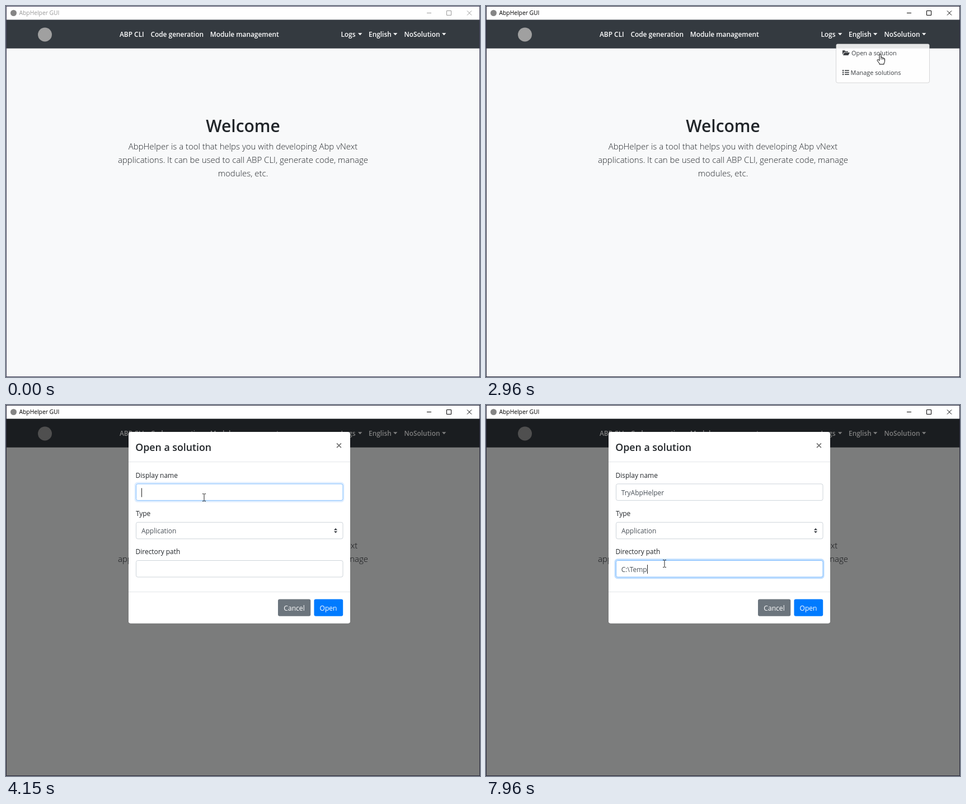
Recreate the animation shown at these times as an HTML page with a canvas. Size 847x662 px, loop 8000 ms.

```html
<!DOCTYPE html>
<html lang="en">
<head>
<meta charset="utf-8">
<title>AbpHelper GUI</title>
<style>
  html, body { margin: 0; width: 847px; height: 662px; overflow: hidden; }
  canvas { display: block; }
</style>
</head>
<body>
<canvas id="stage" width="847" height="662"></canvas>
<script>
const W = 847, H = 662, LOOP = 8000;
const screen2d = document.getElementById('stage').getContext('2d');
const layer = document.createElement('canvas');
layer.width = W;
layer.height = H;
const layer2d = layer.getContext('2d');
let ctx = screen2d;

const INK = '#212529';
const MODAL = [219, 48, 396, 341.5, 4];

// ---------- drawing helpers ----------
function text(str, x, y, size, color = INK, weight = 400, align = 'left') {
  ctx.font = `${weight} ${size}px "Open Sans", "Noto Sans", sans-serif`;
  ctx.textAlign = align;
  ctx.fillStyle = color;
  ctx.fillText(str, x, y);
}

function rect(x, y, w, h, color) {
  ctx.fillStyle = color;
  ctx.fillRect(x, y, w, h);
}

function box(x, y, w, h, r, fill, stroke, width = 1) {
  ctx.beginPath();
  ctx.roundRect(x, y, w, h, r);
  if (fill) { ctx.fillStyle = fill; ctx.fill(); }
  if (stroke) { ctx.strokeStyle = stroke; ctx.lineWidth = width; ctx.stroke(); }
}

function disc(x, y, r, color) {
  ctx.beginPath();
  ctx.arc(x, y, r, 0, Math.PI * 2);
  ctx.fillStyle = color;
  ctx.fill();
}

function shape(points, color) {
  ctx.beginPath();
  points.forEach(([x, y]) => ctx.lineTo(x, y));
  ctx.closePath();
  ctx.fillStyle = color;
  ctx.fill();
}

function cross(x, y, r, color, width) {
  ctx.beginPath();
  ctx.moveTo(x - r, y - r); ctx.lineTo(x + r, y + r);
  ctx.moveTo(x + r, y - r); ctx.lineTo(x - r, y + r);
  ctx.strokeStyle = color;
  ctx.lineWidth = width;
  ctx.stroke();
}

// Paints a group on its own layer, then blends it as a whole.
function fade(alpha, paint) {
  if (alpha <= 0) return;
  layer2d.clearRect(0, 0, W, H);
  ctx = layer2d;
  paint();
  ctx = screen2d;
  ctx.globalAlpha = alpha;
  ctx.drawImage(layer, 0, 0);
  ctx.globalAlpha = 1;
}

// ---------- timing helpers ----------
// Value of the last [time, value] pair that has been reached.
function hold(t, pairs, value) {
  for (const [time, next] of pairs) if (t >= time) value = next;
  return value;
}

// Eased progress in whole steps, so the pointer jumps as in a screen recording.
function stepped(t, start, interval, count, first = 1) {
  const k = Math.floor((t - start) / interval) + first;
  const p = Math.min(1, Math.max(0, k / count));
  return p * p * (3 - 2 * p);
}

// ---------- window ----------
function drawWindow(active) {
  const tone = active ? '#000' : '#999';
  rect(0, 0, W, H, active ? '#2b2a3c' : '#45435c');
  rect(1, 1, W - 2, 24, '#fff');
  disc(13.5, 12.5, 5.5, '#858585');
  text('AbpHelper GUI', 23.5, 16.3, 10.3, tone);
  rect(752, 12, 8, 1, tone);
  box(787.5, 8.5, 8, 8, 0, null, tone);
  cross(828, 12.5, 4, tone, 1);
}

function drawPage() {
  rect(1, 25, W - 2, H - 26, '#f8f9fa');
  rect(1, 24.5, W - 2, 51.2, '#343a40');
  disc(69.5, 51, 12.5, '#a0a0a0');

  const links = [['ABP CLI', 203], ['Code generation', 258.4], ['Module management', 364.7],
    ['Logs', 598.4], ['English', 648], ['NoSolution', 711.4]];
  for (const [label, x] of links) text(label, x, 55, 11.9, '#fff', 600);
  for (const x of [629, 692, 779]) shape([[x, 48.3], [x + 7.4, 48.3], [x + 3.7, 52.2]], '#fff');

  text('Welcome', 423.5, 225, 30, INK, 600, 'center');
  const lead = ['AbpHelper is a tool that helps you with developing Abp vNext',
    'applications. It can be used to call ABP CLI, generate code, manage', 'modules, etc.'];
  lead.forEach((line, i) => text(line, 423.5, 256 + i * 24, 15, INK, 300, 'center'));
}

function drawMenu() {
  box(625.5, 67.5, 167, 69.5, 3, '#fff', 'rgba(0,0,0,.17)');
  shape([[637, 87], [637, 79.3], [641, 79.3], [642.4, 80.8], [647, 80.8], [647, 82.3],
    [639.8, 82.3]], INK);
  shape([[638, 88], [640.3, 83.1], [650, 83.1], [647.4, 88]], INK);
  text('Open a solution', 653, 87.7, 10.9);
  for (const y of [114, 117.5, 121]) {
    rect(637, y, 2.2, 2.2, INK);
    rect(641, y + 0.3, 7.8, 1.6, INK);
  }
  text('Manage solutions', 651.6, 122.7, 10.9);
}

// ---------- dialog ----------
function drawBackdrop(alpha) {
  if (!alpha) return;
  ctx.beginPath();
  ctx.rect(1, 25, W - 2, H - 26);
  ctx.roundRect(...MODAL);
  ctx.fillStyle = `rgba(0,0,0,${alpha / 2})`;
  ctx.fill('evenodd');
}

function drawField(y, focus = 0) {
  if (focus) box(231, y - 1.2, 372, 32.9, 4, null, `rgba(0,123,255,${focus * 0.25})`, 3);
  box(232.5, y + 0.5, 369.5, 29.5, 3, '#fff', focus ? '#80bdff' : '#ced4da');
}

function drawInput(y, value, caret, misspelt) {
  const x = 241.7;
  text(value, x, y + 20.6, 11.95, '#495057');
  const width = ctx.measureText(value).width;
  if (misspelt) {
    ctx.beginPath();
    for (let dx = 0; dx <= width; dx += 2) ctx.lineTo(x + dx, y + (dx % 4 ? 23.6 : 22));
    ctx.strokeStyle = '#e5484d';
    ctx.lineWidth = 1;
    ctx.stroke();
  }
  if (caret) rect(Math.round(x + width), y + 8, 1, 16, '#222');
}

function drawModal(t) {
  const nameFocus = t < 5640 ? hold(t, [[4150, 0.5], [4230, 1]], 0) : 0;
  const pathFocus = hold(t, [[5640, 0.4], [5710, 0.8], [5790, 1]], 0);
  const name = t >= 4870 ? 'TryAbpHelper' : '';
  const typed = hold(t, [[6250, 1], [6780, 2], [6940, 3], [7410, 4], [7660, 5], [7790, 6], [7960, 7]], 0);
  const nameCaret = nameFocus && !(t >= 4620 && t < 4870);
  const pathCaret = pathFocus && !(t >= 6170 && t < 6250);

  box(...MODAL, '#fff');
  text('Open a solution', 231.3, 82, 17.75, INK, 600);
  cross(595, 72.3, 3.9, '#777', 1.8);
  rect(219, 101, 396, 1, '#e3e6e9');
  rect(219, 333, 396, 1, '#e3e6e9');

  text('Display name', 231.6, 129.7, 11.95);
  drawField(140.3, nameFocus);
  drawInput(140.3, name, nameCaret, nameFocus && t >= 5180);

  text('Type', 231.9, 198, 11.95);
  drawField(208.8);
  text('Application', 242, 229, 11.95, '#495057');
  shape([[586, 223.2], [592, 223.2], [589, 219.8]], '#343a40');
  shape([[586, 225.2], [592, 225.2], [589, 228.6]], '#343a40');

  text('Directory path', 231.6, 266.3, 11.95);
  drawField(277, pathFocus);
  drawInput(277, 'C:\\Temp'.slice(0, typed), pathCaret, false);

  box(486, 346.5, 58.3, 30.3, 3, '#6c757d');
  box(550.5, 346.5, 51.7, 30.3, 3, '#007bff');
  text('Cancel', 515, 366.6, 12.1, '#fff', 500, 'center');
  text('Open', 576, 366.6, 12.1, '#fff', 500, 'center');
}

// ---------- pointer ----------
const HAND = new Path2D('M-1.5 12V1.6Q-1.5 .5 0 .5T1.5 1.6V6Q3.6 5.2 4 7Q6 6.4 6.2 8Q8 7.6 8 9.4V13' +
  'Q8 15 6.6 16.5V18.5H-1.5V17L-5.2 12.2Q-6 10.6 -4.6 10.2T-1.5 12Z');
const ARROW = new Path2D('M.5 .8V16.5L4 13.2L6.4 18.4L8.7 17.4L6.4 12.4H11.4Z');

function drawPointer(kind, x, y) {
  ctx.save();
  ctx.translate(x, y);
  ctx.lineWidth = 1;
  ctx.lineJoin = 'round';
  ctx.strokeStyle = '#000';
  ctx.fillStyle = '#fff';
  if (kind === 'beam') {
    rect(-0.5, -6, 1, 12, '#222');
    for (const dy of [-7, 6]) {
      rect(-3, dy, 2.5, 1, '#222');
      rect(0.5, dy, 2.5, 1, '#222');
    }
  } else {
    const path = kind === 'hand' ? HAND : ARROW;
    ctx.fill(path);
    ctx.stroke(path);
    if (kind === 'hand') {
      rect(1.2, 6, 0.8, 4, '#000');
      rect(3.6, 7, 0.8, 3, '#000');
      rect(5.8, 8, 0.8, 2, '#000');
    }
  }
  ctx.restore();
}

function pointerAt(t) {
  const moves = [
    [stepped(t, 290, 82.8, 7, 0), 742.5, 55.5],
    [stepped(t, 1890, 72.5, 5), 704.5, 85.5],
    [stepped(t, 3440, 80, 8), 354, 165],
    [stepped(t, 5250, 78, 6), 319, 283],
  ];
  let x = 807, y = 612;
  for (const [p, toX, toY] of moves) {
    x += (toX - x) * p;
    y += (toY - y) * p;
  }
  return [x, y];
}

function pointerKind(t, x, y) {
  if (t < 3440) return y < 95 ? 'hand' : 'arrow';
  const inField = x > 232 && x < 602 && ((y > 140 && y < 171) || y > 277);
  return inField ? 'beam' : 'arrow';
}

// ---------- scene ----------
function render(t) {
  const menu = hold(t, [[1510, 0.2], [1600, 0.48], [1660, 0.75], [1720, 1], [2960, 0.88], [3050, 0]], 0);
  const modal = hold(t, [[3050, 0.61], [3130, 0.92], [3220, 1]], 0);
  drawWindow(t >= 1420);
  drawPage();
  fade(menu, drawMenu);
  drawBackdrop(modal);
  fade(modal, () => drawModal(t));
  if (t >= 290) {
    const [x, y] = pointerAt(t);
    drawPointer(pointerKind(t, x, y), x, y);
  }
}

let start;
function tick(now) {
  start ??= now;
  render((now - start) % LOOP);
  requestAnimationFrame(tick);
}
requestAnimationFrame(tick);
</script>
</body>
</html>
```
